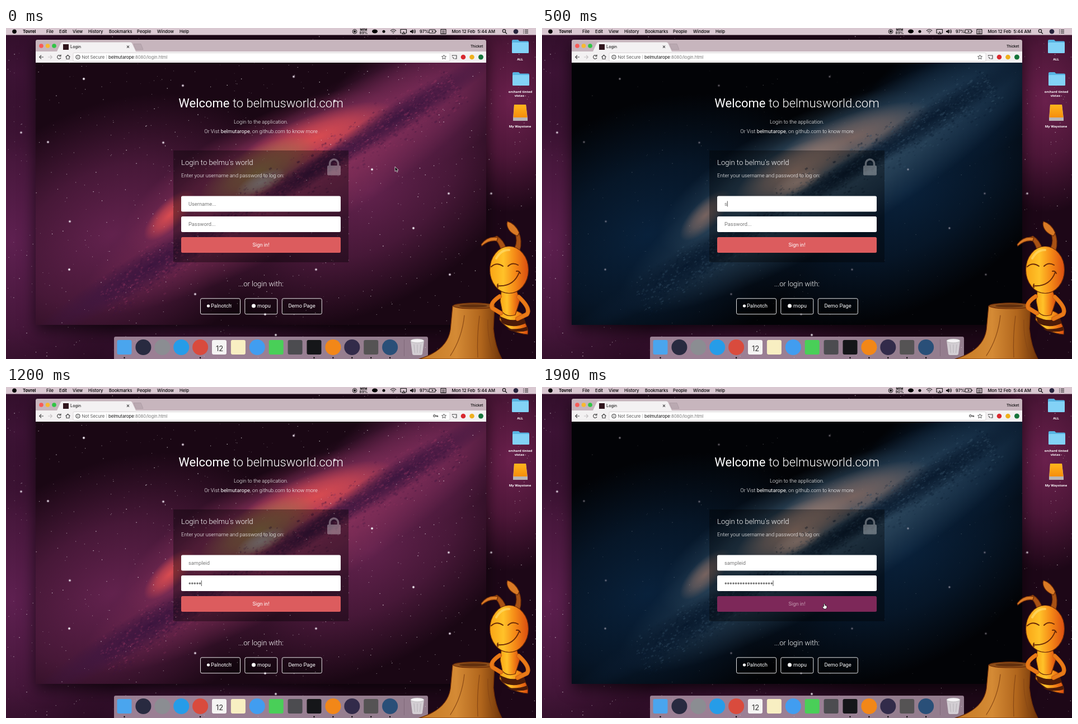
An HTML page with a canvas for the animation above (2 s loop, 947 px wide and 592 px high).

```html
<!DOCTYPE html>
<html lang="en">
<head>
<meta charset="utf-8">
<title>Login</title>
<style>
  html, body { margin: 0; width: 100%; height: 100%; overflow: hidden; background: #1a0614; }
  canvas, svg { position: absolute; left: 0; top: 0; width: 947px; height: 592px; }
  text { white-space: pre; }
  .ui { font-family: Inter, "Open Sans", sans-serif; }
  .page { font-family: Roboto, "Liberation Sans", sans-serif; font-weight: 300; fill: #fff; }
  .mid { text-anchor: middle; }
  .strong { font-weight: 500; }
  .label { font: 700 5.9px "Open Sans", sans-serif; fill: #fff; text-anchor: middle; }
  .dots { font-family: "Liberation Sans", Arial, sans-serif; font-size: 13px; }
  .line { fill: none; stroke: #4d4d4d; stroke-width: 1.2; }
</style>
</head>
<body>
<canvas id="sky" width="947" height="592"></canvas>
<svg viewBox="0 0 947 592" xmlns="http://www.w3.org/2000/svg">
  <defs>
    <linearGradient id="skin"><stop offset="0" stop-color="#f9a516"/><stop offset=".35" stop-color="#ffc229"/><stop offset=".65" stop-color="#f58a17"/><stop offset="1" stop-color="#d94c10"/></linearGradient>
    <linearGradient id="wood"><stop offset="0" stop-color="#c67a25"/><stop offset=".45" stop-color="#d48a35"/><stop offset=".75" stop-color="#b0651c"/><stop offset="1" stop-color="#6e3409"/></linearGradient>
    <linearGradient id="drive" x2="0" y2="1"><stop offset="0" stop-color="#ffb61c"/><stop offset="1" stop-color="#f58d0c"/></linearGradient>
  </defs>

  <!-- menu bar -->
  <g class="ui" font-size="7.7" font-weight="500">
    <rect width="947" height="12.5" fill="#d9c8d1"/>
    <circle cx="15" cy="6.2" r="3.8"/>
    <g id="menus"></g>
    <circle cx="623" cy="6.3" r="3.8" fill="none" stroke="#111"/><circle cx="623" cy="6.3" r="2"/>
    <text class="mid" x="639" y="5.4" font-size="5.2" font-weight="700">MEM</text>
    <text class="mid" id="mem" x="639" y="11" font-size="6.6"></text>
    <ellipse cx="659" cy="6" rx="5" ry="3.5"/><circle cx="675" cy="6.2" r="2.5"/>
    <g fill="none" stroke="#111" stroke-width="1.1">
      <path d="M687 5q5-5 10 0M689 7q3-3 6 0M691 9q1-1 2 0"/>
      <path d="M707 9h-2V2.500h10.500V9h-2M708 10.500l2.500-3.500 2.500 3.500z"/>
      <path d="M728 3.500q2 2.500 0 5M730 2.500q3 3.500 0 7"/>
      <rect x="756" y="3" width="11" height="6" rx="1"/><path d="M768.500 5v2M761 5l2 1-2 1"/>
      <rect x="777" y="2.500" width="9" height="8"/><path d="M779 5h5M779 7h5M779 9h5" stroke-width=".8"/>
      <circle cx="890" cy="5.300" r="2.700"/><path d="M892 7.500l3 3"/>
      <path d="M924 3.500h1.500M927 3.500h6M924 6.300h1.500M927 6.300h6M924 9h1.500M927 9h6"/>
    </g>
    <path d="M722 5h2l3-2.500v7.500l-3-2.500h-2z"/>
    <circle cx="911" cy="6.200" r="4.300" fill="#28243d"/>
  </g>

  <!-- browser frame -->
  <g class="ui">
    <path d="M53 62V24q0-3 3-3h799q3 0 3 3v38z" fill="#c7b5bd"/>
    <path d="M228 28.500h13l4 10h-13z" fill="#baa9b1" stroke="#a8979f" stroke-width=".7"/>
    <path d="M91 42l7-15q1-1.500 3-1.500h121q2 0 3 1.500l7 15H858v20H53V42z" fill="#f3f1f2"/>
    <circle cx="63" cy="32" r="3.800" fill="#f85b57"/><circle cx="74.500" cy="32" r="3.800" fill="#f8b92f"/><circle cx="86" cy="32" r="3.800" fill="#2fc544"/>
    <rect x="102" y="29" width="10" height="10" fill="#30151d"/>
    <text x="115" y="36.300" font-size="7.300">Login</text>
    <path class="line" d="M216 31.700l4 4M220 31.700l-4 4"/>
    <text x="830" y="34.500" font-size="6.300" font-weight="500">Thicket</text>
    <rect x="120" y="44.500" width="673" height="15" rx="1.500" fill="#fff" stroke="#d2cfd0" stroke-width=".8"/>
    <path class="line" d="M67 52h-7M63 48.800L59.700 52l3.300 3.200"/>
    <path class="line" d="M75 52h7M79 48.800l3.300 3.200-3.300 3.200" style="stroke:#c5c2c3"/>
    <path class="line" d="M97.500 50a3.300 3.300 0 1 0 .5 3M98 47.500v3h-3"/>
    <path class="line" d="M106.500 52l4-3.600 4 3.600M108 51.500v4h5v-4"/>
    <circle class="line" cx="128.500" cy="52" r="3.500"/><path class="line" d="M128.500 51.500v2.300M128.500 49.700v1"/>
    <g font-size="7.700">
      <text x="135.500" y="54.800" fill="#555">Not Secure</text>
      <path d="M179.500 48v8" stroke="#ccc"/>
      <text x="183" y="54.800" fill="#777"><tspan fill="#111">belmutarope</tspan>:8080/login.html</text>
    </g>
    <g id="key" class="line"><circle cx="765.500" cy="51.700" r="1.800"/><path d="M767.500 51.700h4v2M769.700 51.700v1.700"/></g>
    <path class="line" stroke-linejoin="round" style="stroke-width:.9" d="M782.500 48l1.100 2.700 2.900.2-2.200 1.900.7 2.900-2.500-1.600-2.500 1.600.7-2.900-2.200-1.900 2.900-.2z"/>
    <path class="line" d="M797.500 50.500v-1.500h7.500v6h-3.500M797.500 52.500q2.500 0 2.500 2.800"/>
    <circle cx="817" cy="52" r="4.300" fill="#d8282f"/><circle cx="832.500" cy="52" r="4.300" fill="#eeb01e"/><circle cx="848.500" cy="52" r="4.500" fill="#16753b"/>
  </g>

  <!-- login page -->
  <g class="page" font-size="9.300">
    <text class="mid" x="455.500" y="141.500" font-size="22"><tspan font-weight="400">Welcome</tspan> to belmusworld.com</text>
    <text class="mid" x="455.500" y="171">Login to the application.</text>
    <text class="mid" x="455.500" y="188">Or Vist <tspan font-weight="400">belmutarope</tspan>, on github.com to know more</text>
    <rect x="299" y="219" width="313" height="200" fill="#000" fill-opacity=".36"/>
    <text x="313" y="245.300" font-size="13.100">Login to belmu's world</text>
    <text x="313" y="267">Enter your username and password to log on:</text>
    <g opacity=".33"><rect x="574" y="246" width="24" height="17.500" rx="2"/><path d="M578.500 246v-3.500a7.500 7.500 0 0 1 15 0v3.500" fill="none" stroke="#fff" stroke-width="3.500"/></g>
    <rect x="313" y="300.500" width="285" height="28" rx="2.500"/>
    <rect x="313" y="337" width="285" height="28" rx="2.500"/>
    <text id="user" x="326" y="317.600" fill="#777" font-weight="400"></text>
    <text id="pass" x="326" y="354.400" fill="#777" font-weight="400"></text>
    <text id="dots" class="dots" x="326" y="355.800" fill="#777"></text>
    <path id="caret" d="M0-5V5" stroke="#444" stroke-width=".9"/>
    <rect id="button" x="313" y="374" width="285" height="28" rx="2.500"/>
    <text id="sign" class="mid" x="455.500" y="391" font-weight="400">Sign in!</text>
    <text class="mid" x="455.500" y="462.300" font-size="12.900">...or login with:</text>
    <g fill="#000" fill-opacity=".3" stroke="#fff" stroke-width=".9"><rect x="347.500" y="483.800" width="71" height="28" rx="2.500"/><rect x="426.800" y="483.800" width="58" height="28" rx="2.500"/><rect x="493.300" y="483.800" width="71" height="28" rx="2.500"/></g>
    <g font-weight="400" font-size="9.400"><text x="366" y="500.300">Palnotch</text><text x="449" y="500.300">mopu</text><text class="mid" x="528.500" y="500.300">Demo Page</text></g>
    <circle cx="361.500" cy="497" r="2.600"/><circle cx="442.500" cy="497" r="3.500"/>
  </g>

  <!-- desktop icons -->
  <g id="folder"><path d="M904 23q0-2 2-2h9l2.500 2.500H932q2 0 2 2V43q0 2-2 2h-26q-2 0-2-2z" fill="#57b4e2"/><rect x="904" y="26" width="30" height="19" rx="1.500" fill="#83d2f6"/></g>
  <use href="#folder" x="1" y="58"/>
  <path d="M908 137h21l3 24v5h-26v-5z" fill="#b9b5b5"/><path d="M908 137h21l2.500 23h-25z" fill="url(#drive)"/>
  <g class="label"><text x="918.500" y="58">ALL</text><text x="919" y="116">orchard tinted</text><text x="919" y="123">vistas -</text><text x="918.500" y="177.500">My Waystone</text></g>

  <!-- dock -->
  <rect x="193" y="552" width="561" height="42" rx="3" fill="#cdb5c7" fill-opacity=".68"/>
  <g id="dock"></g>
  <text class="ui mid" x="381.500" y="578" font-size="13" fill="#333">12</text>
  <path d="M711.500 557v30" stroke="#806a7b"/>
  <path d="M723 559h24l-3 24q-.5 2-3 2h-12q-2.500 0-3-2z" fill="#d9d7da" fill-opacity=".9"/><ellipse cx="735" cy="559.500" rx="12" ry="3.500" fill="#f5f3f5" stroke="#aaa" stroke-width=".7"/>
  <path d="M729 566l1.500 15M735 566v15M741 566l-1.500 15" stroke="#b6b2b7"/>

  <!-- insect and stump -->
  <g stroke="#6b2b08" stroke-width="1.200" stroke-linejoin="round" stroke-linecap="round">
    <path d="M883 508Q905 499 922 511L928 528Q934 539 932 548Q902 546 882 522Z" fill="url(#skin)"/>
    <path d="M882 515Q905 528 925 518L929 528Q905 539 886 527ZM895 538Q916 540 931 534L932 541Q920 545 903 542Z" fill="#4c1c09" stroke="none"/>
    <path d="M798 497Q835 487 873 496L871 538Q874 570 886 592H738Q788 577 794 540Z" fill="url(#wood)"/>
    <ellipse cx="836" cy="497" rx="37" ry="5" fill="#8b4d19"/><ellipse cx="835" cy="497" rx="25" ry="2.800" fill="#62300e" stroke="none"/>
    <path d="M819 514q-4 40-25 72M846 515q-5 38-3 74M861 522q-1 37 12 67" fill="none" stroke="#8a4915"/>
    <path d="M885 471q14 7 28 0l5 17-8 25q-14 5-23-5l-4-20z" fill="url(#skin)"/>
    <g fill="none"><path id="arms" d="M882 480q-18 12-13 21l15 9M916 481q22 20 15 31l-17 8" stroke-width="7.500"/><use href="#arms" stroke="#e06f14"/></g>
    <path d="M882 480q-18 12-13 21l15 9M916 481q22 20 15 31l-17 8" fill="none" stroke="#e87a18" stroke-width="5"/>
    <path d="M885 399q-4-17-15-24l7-3q12 7 17 23zM909 393q6-13 0-27l7-1q7 16 2 33z" fill="#a95214"/>
    <path d="M849 387q12-16 30-12l-2 6q-14-2-27 9zM896 346q14 4 21 20l-3 6q-18-7-19-22z" fill="#d97a25"/>
    <ellipse cx="899" cy="432.500" rx="34.500" ry="42" fill="url(#skin)"/>
    <path d="M867 427q10-9 21-1M897 426q8-8 18-2M879 461q28 2 38-24M912 435q5-1 7 4M879 458q-2 3 0 6" fill="none" stroke-width="2"/>
    <path d="M876 412q9-16 23-15" fill="none" stroke="#ffe176" stroke-width="4" opacity=".6"/>
  </g>

  <g id="pointer" stroke-linejoin="round">
    <path id="arrow" d="M0 0v8.500l2-1.700 1.500 3 1.500-.7-1.400-2.900 2.600-.2z" fill="#111" stroke="#fff" stroke-width=".7"/>
    <path id="beam" d="M-2-4.500q2 0 2 1.500 0-1.500 2-1.500M0-3.500v7M-2 4.500q2 0 2-1.500 0 1.500 2 1.500" fill="none" stroke="#111"/>
    <path id="hand" d="M-1.500-4q1-1 2 0v2.500l3.500 1v3l-1.500 2.500h-4l-2.500-4 1-1 1.500 1z" fill="#fff" stroke="#111" stroke-width=".8"/>
  </g>
</svg>
<script>
const W = 947, H = 592, PAGE = [53, 62, 805, 468.5];
const $ = id => document.getElementById(id);
const view = $('sky').getContext('2d');

let seed;
const rand = () => (seed = seed * 16807 % 2147483647) / 2147483647;
const spread = () => rand() + rand() + rand() - 1.5;

function layer(paint) {
  const canvas = document.createElement('canvas');
  canvas.width = W;
  canvas.height = H;
  seed = 4711;
  paint(canvas.getContext('2d'));
  return canvas;
}

function blob(c, x, y, rx, ry, deg, color) {
  const g = c.createRadialGradient(0, 0, 0, 0, 0, 1);
  g.addColorStop(0, color);
  g.addColorStop(0.5, color + 'a0');
  g.addColorStop(1, color + '00');
  c.save();
  c.translate(x, y);
  c.rotate(deg * Math.PI / 180);
  c.scale(rx, ry);
  c.fillStyle = g;
  c.fillRect(-1, -1, 2, 2);
  c.restore();
}

const bright = [[139, 91], [75, 204], [114, 346], [113, 432], [514, 87], [281, 205], [654, 253], [791, 296],
  [554, 432], [728, 358], [316, 103], [338, 476], [463, 512], [587, 130], [793, 441], [482, 549], [27, 187], [867, 296]];

function stars(c, count, alpha) {
  c.fillStyle = '#fff';
  for (let i = 0; i < count; i++) {
    const size = 0.5 + rand() * 0.8;
    c.globalAlpha = alpha * (0.2 + 0.7 * rand());
    c.fillRect(rand() * W, rand() * H, size, size);
  }
  c.globalAlpha = alpha;
  bright.forEach(([x, y], i) => {
    blob(c, x, y, 3, 3, 0, '#c8b4c8');
    c.beginPath();
    c.arc(x, y, i % 3 ? 0.9 : 1.4, 0, 7);
    c.fill();
  });
  c.globalAlpha = 1;
}

function galaxy(t) {
  return layer(c => {
    c.fillStyle = t.base;
    c.fillRect(0, 0, W, H);
    // broad haze from the lower left to the upper right
    blob(c, 190, 370, 340, 230, -25, t.haze);
    blob(c, 650, 290, 330, 200, -32, t.haze);
    blob(c, 760, 115, 240, 120, -31, t.haze);
    blob(c, 520, 268, 440, 105, -31, t.rim);
    blob(c, 450, 258, 270, 90, -28, t.rim);
    blob(c, 555, 196, 150, 42, -20, t.lobe);
    blob(c, 292, 335, 60, 24, -45, t.lobe);
    blob(c, 450, 258, 115, 44, -27, t.core);
    blob(c, 700, 160, 210, 28, -32, t.lane);
    blob(c, 545, 258, 150, 22, -31, t.lane);
    blob(c, 260, 425, 250, 32, -31, t.lane);
    blob(c, 455, 276, 48, 18, -25, t.heart);
    // ragged dust along the dark lane
    c.save();
    c.translate(540, 262);
    c.rotate(-0.55);
    for (let i = 0; i < 2600; i++) {
      const size = 0.8 + rand() * 2.4;
      c.globalAlpha = 0.12 + rand() * 0.28;
      c.fillStyle = i % 2 ? t.lane : t.rim;
      c.fillRect(-430 + rand() * 740, spread() * 36, size * 1.6, size);
    }
    c.restore();
    // the third picture is cropped slightly closer
    c.translate(454, 256);
    c.scale(t.zoom || 1, t.zoom || 1);
    c.translate(-454, -256);
    stars(c, t.count, t.shine);
  });
}

const spaces = [
  { base: '#07090b', haze: '#302c31', rim: '#5d4a4b', lobe: '#ad6c38', core: '#a0704d', heart: '#8d8389', lane: '#161418', count: 900, shine: 1 },
  { base: '#020306', haze: '#09213b', rim: '#334f65', lobe: '#77635f', core: '#a68678', heart: '#b79c91', lane: '#0a1b2f', count: 350, shine: 0.3 },
  { base: '#030405', haze: '#091013', rim: '#1d3d37', lobe: '#38ae57', core: '#489458', heart: '#c3946f', lane: '#080e1c', count: 550, shine: 0.9, zoom: 1.033 },
  { base: '#1a0714', haze: '#62224d', rim: '#8d335e', lobe: '#d84b50', core: '#96754a', heart: '#a59697', lane: '#3d163f', count: 900, shine: 1 }
].map(galaxy);

const desktop = layer(c => {
  c.fillStyle = '#1d0717';
  c.fillRect(0, 0, W, H);
  blob(c, 10, 380, 210, 310, 0, '#5e2050');
  blob(c, 20, 80, 170, 160, 0, '#3d1335');
  blob(c, 900, 130, 140, 200, 0, '#6a204c');
  blob(c, 330, 570, 320, 70, 0, '#37102f');
  stars(c, 900, 0.9);
  c.shadowColor = '#0009';
  c.shadowBlur = 24;
  c.shadowOffsetY = 9;
  c.fillStyle = '#000';
  c.fillRect(53, 22, 805, 508);
});

const svg = (tag, attrs, text = '') =>
  `<${tag} ${Object.entries(attrs).map(([k, v]) => `${k}="${v}"`).join(' ')}>${text}</${tag}>`;

const menus = { Tovrel: 30, File: 72, Edit: 95, View: 119, History: 147, Bookmarks: 184, People: 234, Window: 270,
  Help: 310, '97%': 739, 'Mon 12 Feb  5:44 AM': 796.5 };
$('menus').innerHTML = Object.entries(menus).map(([text, x], i) =>
  svg('text', { x, y: 9.2, 'font-weight': i ? 500 : 700 }, text)).join('');

// shape, colour, then * for a running application
const apps = ['s#4aa5ee*', 'c#282a40', 'c#8b8d92', 'c#269ce8', 'c#d94b3d*', 's#f5f4f3', 's#f8efc2', 'c#419df0', 's#49cf58',
  's#4c4c50', 's#151619*', 'c#f28718*', 'c#322b4a*', 's#555354*', 'c#294f78*'];
$('dock').innerHTML = apps.map((app, i) => {
  const x = 211.5 + i * 33.9, fill = app.slice(1, 8);
  const icon = app[0] === 'c'
    ? svg('circle', { cx: x, cy: 571, r: 14, fill })
    : svg('rect', { x: x - 13, y: 558, width: 26, height: 26, rx: 3, fill });
  return icon + (app.endsWith('*') ? svg('circle', { cx: x, cy: 589.7, r: 1.2 }) : '');
}).join('');

// latest entry at or before the given step
const at = (table, step) => table.filter(row => row[0] <= step).pop().slice(1);

const pointers = [[0, 'arrow', 695, 248], [1, 'arrow', 639, 281], [2, 'beam', 510, 318], [3, 'beam', 480, 315], [5],
  [7, 'beam', 480, 340], [8, 'beam', 480, 351], [10], [19, 'hand', 505, 392]];
const typedName = [[0, ''], [5, 's'], [6, 'sampl'], [7, 'sampleid']];
const typedDots = [[0, 0], [10, 1], [11, 3], [12, 5], [13, 7], [14, 8], [15, 10], [16, 13], [17, 16], [18, 19]];
const memory = [[0, 89], [7, 88], [10, 89], [14, 90]];
const carets = [[0, 0], [3, 1], [4, 0], [5, 1], [7, 0], [8, 1], [9, 0], [10, 1], [14, 0], [16, 1]];

function drawSky(step) {
  const index = Math.floor((step + 13) % 14 / 3.5);
  const show = i => view.drawImage(spaces[i], ...PAGE, ...PAGE);
  view.drawImage(desktop, 0, 0);
  show(index);
  // the purple picture is still fading out
  if (step === 1) {
    view.globalAlpha = 0.12;
    show(3);
    view.globalAlpha = 1;
  }
}

function draw(step) {
  drawSky(step);
  const [name] = at(typedName, step), [count] = at(typedDots, step);
  $('user').textContent = name || 'Username...';
  $('pass').textContent = count ? '' : 'Password...';
  $('dots').textContent = '•'.repeat(count);
  $('mem').textContent = at(memory, step)[0] + '%';
  $('key').style.display = count ? '' : 'none';

  const inPassword = step >= 8;
  const caretX = inPassword ? 326.5 + $('dots').getComputedTextLength()
    : 326.5 + (name ? $('user').getComputedTextLength() : 0);
  $('caret').setAttribute('transform', `translate(${caretX} ${inPassword ? 351 : 314.5})`);
  $('caret').style.display = at(carets, step)[0] ? '' : 'none';

  const hover = step === 19;
  $('button').setAttribute('fill', hover ? '#7d2859' : '#dc5c5e');
  $('sign').setAttribute('fill', hover ? '#c49ab1' : '#fff');

  const [kind, x = 0, y = 0] = at(pointers, step);
  $('pointer').setAttribute('transform', `translate(${x} ${y})`);
  for (const id of ['arrow', 'beam', 'hand']) $(id).style.display = id === kind ? '' : 'none';
}

let shown = -1;
function tick() {
  const step = Math.floor(performance.now() % 2000 / 100);
  if (step !== shown) draw(shown = step);
  requestAnimationFrame(tick);
}
tick();
</script>
</body>
</html>
```
